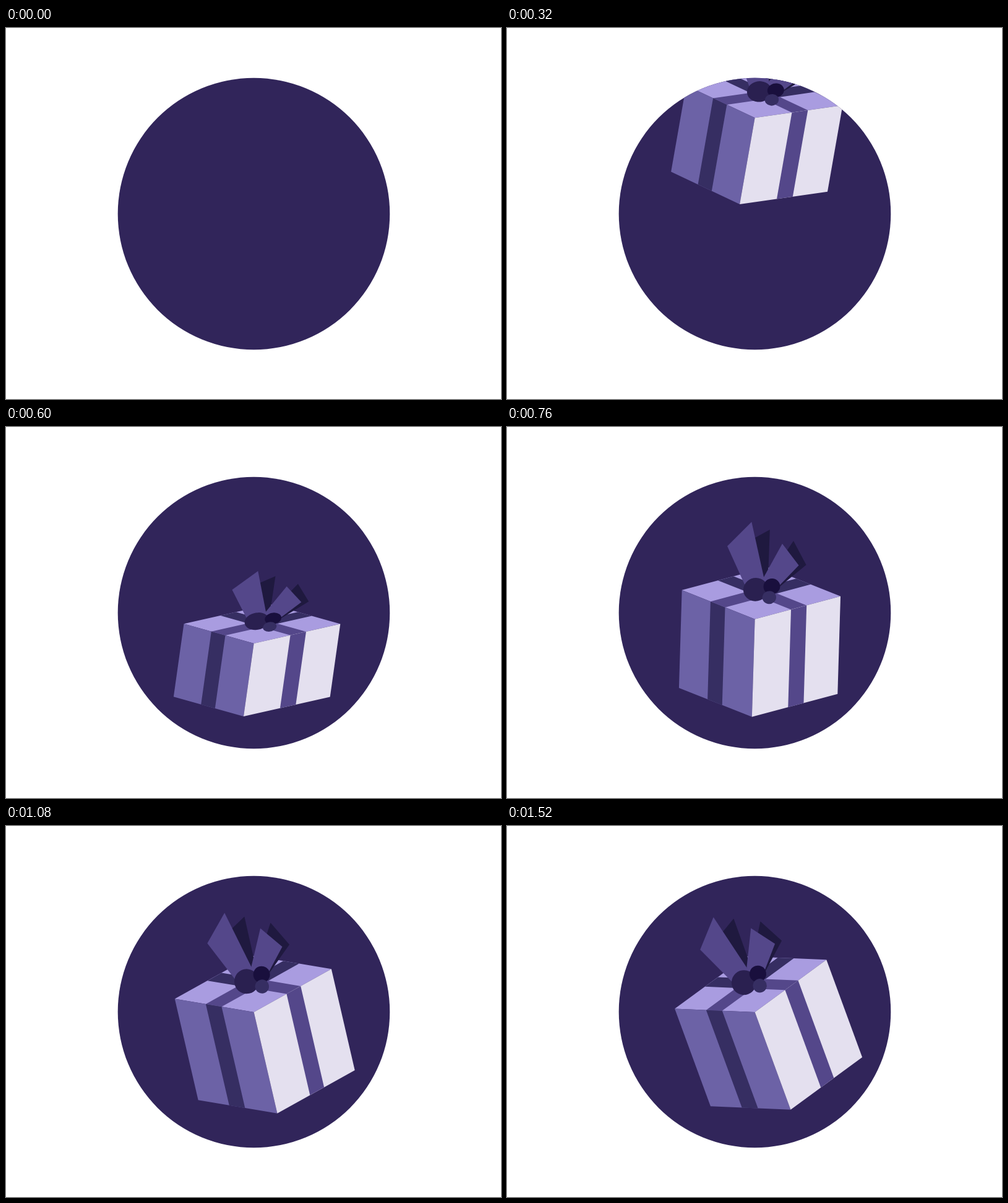
These frames come from a looping animation (800x600 px, 1760 ms). An HTML page with a canvas:

```html
<!DOCTYPE html>
<html lang="en">
<head>
<meta charset="utf-8">
<title>Gift box</title>
<style>
  html, body { margin: 0; height: 100%; overflow: hidden; background: #fff; }
  canvas { display: block; }
</style>
</head>
<body>
<canvas width="800" height="600"></canvas>
<script>
const ctx = document.querySelector('canvas').getContext('2d');
const STEP = 40, STEPS = 44, TILT = 13.5;
const NIGHT = '#31255a', LIGHT = '#a99ce0', SIDE = '#6c62a6', FRONT = '#e4e0ef',
      BAND = '#54478a', SHADE = '#362e62', DARK = '#1f193f';

function poly(color, ...points) {
  ctx.fillStyle = color;
  ctx.beginPath();
  points.forEach(([x, y]) => ctx.lineTo(x, y));
  ctx.fill();
}

function disc(color, x, y, r) {
  ctx.fillStyle = color;
  ctx.beginPath();
  ctx.arc(x, y, r, 0, 2 * Math.PI);
  ctx.fill();
}

// Box space: u runs left, v runs right, h runs down from the front top corner
const at = (u, v, h) => [-120 * u + 137.5 * v + h, -49 * u - 40.5 * v + 168 * h];
const lid = (color, u0, u1, v0, v1) =>
  poly(color, at(u0, v0, 0), at(u1, v0, 0), at(u1, v1, 0), at(u0, v1, 0));
const left = (color, u0, u1) =>
  poly(color, at(u0, 0, 0), at(u1, 0, 0), at(u1, 0, 1), at(u0, 0, 1));
const right = (color, v0, v1) =>
  poly(color, at(0, v0, 0), at(0, v1, 0), at(0, v1, 1), at(0, v0, 1));

// A ribbon rises from the knot, base0 to base1 wide, to two free corners
const ribbon = (color, base0, base1, corner0, corner1) =>
  poly(color, [base0, -56], corner0, corner1, [base1, -56]);

function drawGift() {
  const u0 = 0.408, u1 = 0.608, v0 = 0.422, v1 = 0.604;
  lid(LIGHT, 0, 1, 0, 1);
  lid(SHADE, u0, u1, v1, 1);
  lid(SHADE, u1, 1, v0, v1);
  lid(BAND, u0, u1, 0, v1);
  lid(BAND, 0, u1, v0, v1);
  left(SIDE, 0, 1);
  left(SHADE, u0, u1);
  right(FRONT, 0, 1);
  right(BAND, v0, v1);

  ribbon(DARK, 12, 19, [-11, -136], [19, -154]);
  ribbon(DARK, 10, 38, [58, -135], [80, -94]);
  ribbon(BAND, -17, 16, [-49, -125], [-11, -167]);
  ribbon(BAND, 4, 36, [40, -130], [68, -93]);
  disc('#2a2050', -0.5, -51, 20);
  disc('#190f3d', 25.5, -56.5, 13.5);
  disc(SHADE, 22, -37.5, 11.2);
}

function draw(t) {
  const ramp = (from, to) => Math.min(1, Math.max(0, (t - from) / (to - from)));
  const fall = ramp(0, 15), rebound = ramp(15, 20);
  const swing = ramp(28, 34) - ramp(34, 38);
  const lean = -10.7 * fall - 4.1 * ramp(15, 25.4) - 18.5 * ramp(25.4, 28) + 44.5 * swing;

  ctx.clearRect(0, 0, 800, 600);
  ctx.save();
  disc(NIGHT, 400.5, 300.5, 219.8);
  ctx.clip();
  ctx.translate(400.6, -88.7 + 438.7 * fall - 49 * rebound);
  ctx.rotate(lean * Math.PI / 180);
  ctx.scale(1, 1 - 0.31 * (fall - rebound));
  ctx.rotate(TILT * Math.PI / 180);
  drawGift();
  ctx.restore();
}

const start = performance.now();
function tick() {
  draw(Math.floor((performance.now() - start) / STEP) % STEPS);
  requestAnimationFrame(tick);
}
tick();
</script>
</body>
</html>
```
